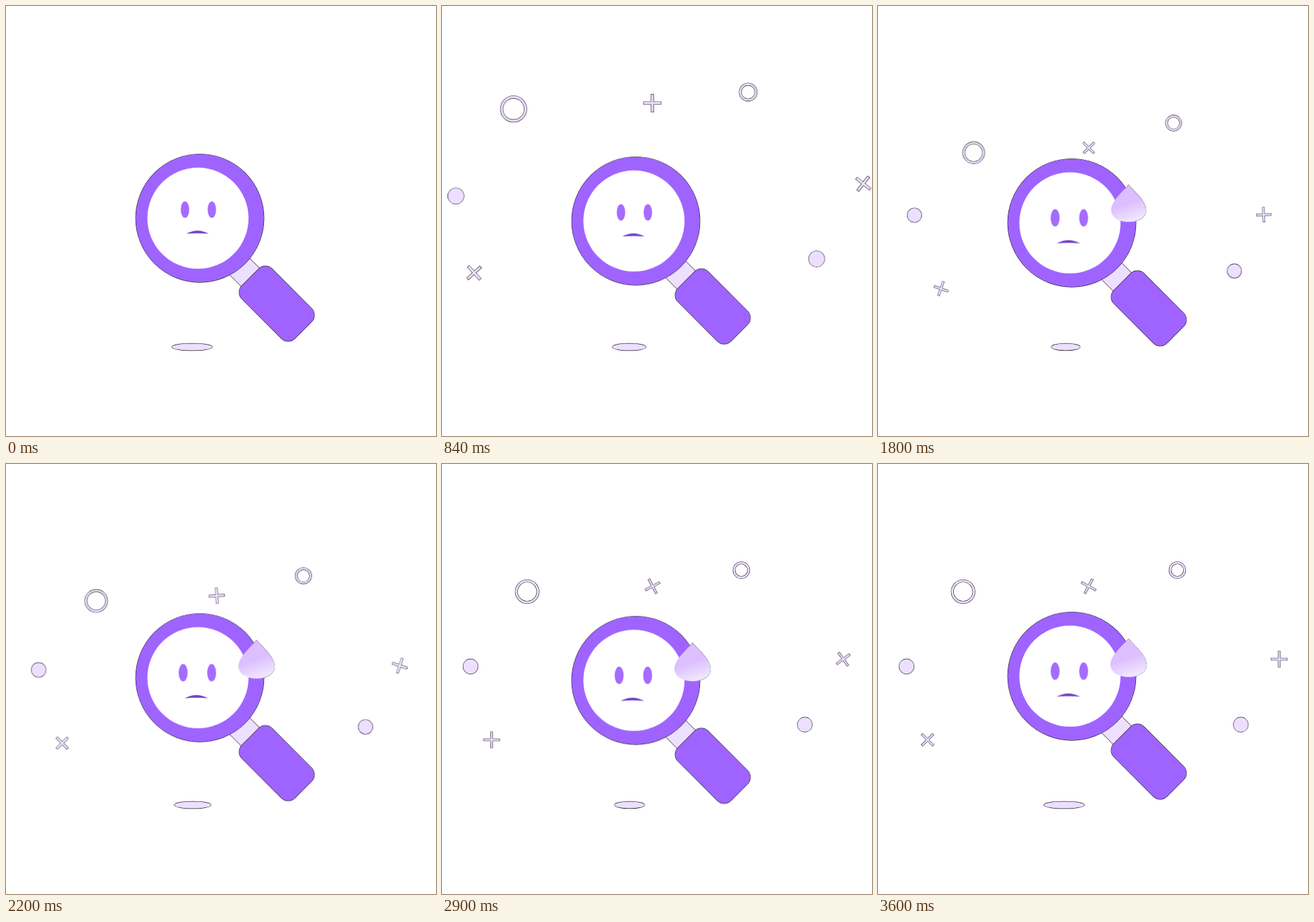
Write an HTML page that moves like this. It is 640x640 px and loops after 3.62 s.

```html
<!DOCTYPE html>
<html lang="en">
<head>
<meta charset="utf-8">
<title>Sad magnifier</title>
<style>
html, body { margin: 0; width: 100%; height: 100%; overflow: hidden; background: #fff; }
svg { display: block; width: 100vw; height: 100vh; }

.edge { stroke: #1c1626; stroke-width: 1.2; paint-order: stroke; }
.edge, .edge * { vector-effect: non-scaling-stroke; }
.pale { fill: #eddfff; }
.main { fill: #9f64ff; }
.eye { fill: #a56cff; }
.mouth { fill: #7443cc; }

.bob, .shadow, .near, .far, .face, .tear, .fade, .spin {
  animation: 3620ms linear infinite;
}
.bob { animation-name: bob; }
.shadow { animation-name: shadow; transform-origin: 277px 507.5px; }
.near, .far { transform-origin: 317px 535px; animation-timing-function: cubic-bezier(.333, .117, .667, .883); }
.near { animation-name: near; }
.far { animation-name: far; }
.face { animation-name: face; transform-origin: 286px 316px; }
.tear { animation-name: tear; transform-origin: 374px 236.5px; }
.fade { animation-name: fade; }
.spin { animation-name: spin; }
.swing { animation-name: swing; }

@keyframes bob {
  0%, 33.15%, 66.3%, 99.45%, 100% { transform: none; }
  16.02%, 49.17%, 82.32% { transform: translateY(7.2px); }
}
@keyframes shadow {
  0%, 33.15%, 66.3%, 99.45%, 100% { transform: none; }
  16.02%, 49.17%, 82.32% { transform: translateX(2.6px) scaleX(.7); }
}
@keyframes near {
  0%, 2.76% { transform: scale(0); }
  17.13% { transform: scale(1.153); }
  41.99% { transform: scale(.9); }
  74.59%, 100% { transform: scale(1); }
}
@keyframes far {
  0%, 3.87% { transform: scale(0); }
  18.23% { transform: scale(1.1); }
  43.09% { transform: scale(.95); }
  75.69%, 100% { transform: scale(1); }
}
@keyframes face {
  0%, 27.62% { transform: none; }
  36.46%, 100% { transform: translate(-1.6px, 6.1px) scale(1.06); }
}
@keyframes tear {
  0%, 32.59% { transform: scale(0); }
  32.6% { transform: scale(.45); }
  50.83%, 100% { transform: scale(1); }
}
@keyframes fade {
  0%, 32.6% { opacity: 0; }
  43.65%, 100% { opacity: 1; }
}
@keyframes spin {
  0%, 2.76% { transform: rotate(0deg); }
  99.45%, 100% { transform: rotate(var(--turn)); }
}
@keyframes swing {
  0%, 23.2% { transform: rotate(0deg); }
  34.25% { transform: rotate(5deg); }
  49.72% { transform: rotate(45deg); }
  60.77% { transform: rotate(86deg); }
  80.11% { transform: rotate(152deg); }
  100% { transform: rotate(210deg); }
}
</style>
</head>
<body>
<svg viewBox="0 0 640 640">
  <defs>
    <linearGradient id="water" gradientUnits="userSpaceOnUse" x1="363" y1="291" x2="373" y2="321">
      <stop offset="0" stop-color="#dcbfff"/>
      <stop offset="1" stop-color="#f5ecff"/>
    </linearGradient>
    <path id="drop" d="M373 259.5C380 269 400 284 400 299C400 310 388 317 373 317C358 317 346 310 346 299C346 284 366 269 373 259.5Z"/>
    <path id="cross" d="M-1.4-11.7h2.8v10.3h10.3v2.8h-10.3v10.3h-2.8v-10.3h-10.3v-2.8h10.3z"/>
  </defs>

  <g class="near pale edge">
    <path fill-rule="evenodd" d="M109.2 190a17.5 17.5 0 1 0 35 0a17.5 17.5 0 1 0-35 0zM112.2 190a14.5 14.5 0 1 0 29 0a14.5 14.5 0 1 0-29 0z"/>
    <g transform="translate(313.5 182)"><use href="#cross" class="spin swing"/></g>
    <g transform="translate(73.8 410.5)"><use href="#cross" class="spin" style="--turn:225deg"/></g>
    <g transform="translate(597.2 290.5)"><use href="#cross" class="spin" style="--turn:180deg"/></g>
  </g>
  <g class="far pale edge">
    <path fill-rule="evenodd" d="M433.3 158a12.2 12.2 0 1 0 24.4 0a12.2 12.2 0 1 0-24.4 0zM435.9 158a9.6 9.6 0 1 0 19.2 0a9.6 9.6 0 1 0-19.2 0z"/>
    <circle cx="42.5" cy="301.3" r="10.9"/>
    <circle cx="540" cy="388" r="10.8"/>
  </g>

  <ellipse class="shadow pale edge" cx="277" cy="507.5" rx="30" ry="5.1"/>

  <g class="bob">
    <use href="#drop" class="tear"/>
    <g class="edge" transform="translate(403 443) rotate(45)">
      <rect class="pale" x="-92" y="-19" width="50" height="38"/>
      <rect class="main" x="-55.6" y="-31.6" width="111.2" height="63.2" rx="14"/>
    </g>
    <circle class="main edge" cx="288.5" cy="315.8" r="95.3"/>
    <circle cx="285.7" cy="315.8" r="75.3" fill="#fff"/>
    <g class="face">
      <ellipse class="eye" cx="266.4" cy="303" rx="6.3" ry="12.2"/>
      <ellipse class="eye" cx="306.4" cy="303" rx="6.3" ry="12.2"/>
      <path class="mouth" d="M268.5 338.8Q285 329.8 301.5 338.8Q285 337.6 268.5 338.8Z"/>
    </g>
    <g class="fade"><use href="#drop" class="tear" fill="url(#water)"/></g>
  </g>
</svg>
</body>
</html>
```
